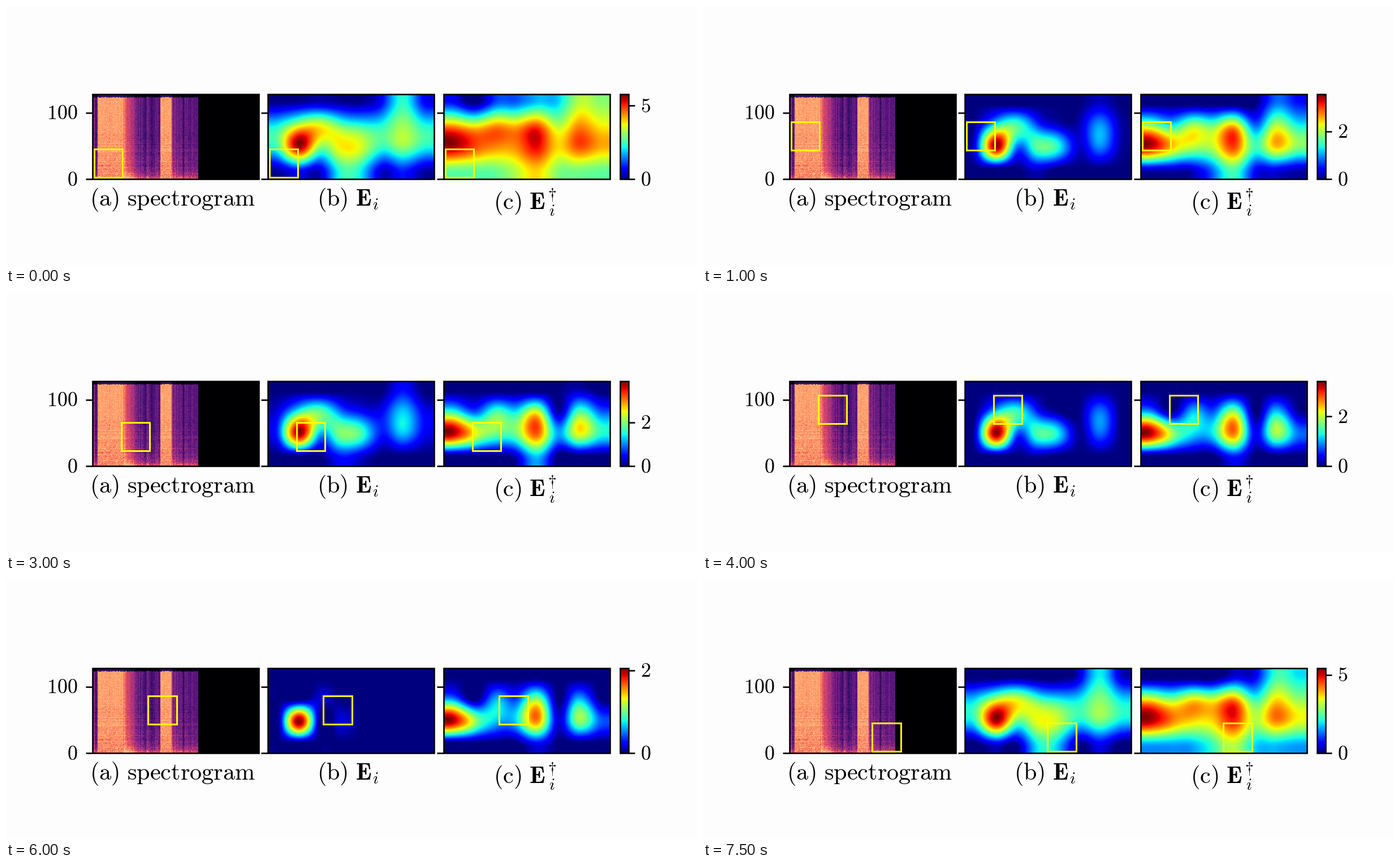
Write a matplotlib script that moves like this. It is 1222 by 458 pixels and loops after 8000 ms.

```python
import numpy as np
import matplotlib.pyplot as plt
from matplotlib.animation import FuncAnimation
from matplotlib.patches import Rectangle

W, H, DPI = 1222, 458, 64
PX = 72 / DPI                       # points per pixel
TOP, BOTTOM, PANEL_W = 156, 306, 293.5
PANELS = (153, 463, 774)
BAR_X, BAR_W = 1085.5, 15
ROWS, COLS = 128, 250               # bins of one map
CELLS_Y, CELLS_X = 4, 8             # coarse cells of one map

plt.rcParams["mathtext.fontset"] = "cm"


def bump(x, y, sx, sy, height):
    """Gaussian hill sampled on the coarse cells."""
    gx = np.exp(-((np.arange(CELLS_X) - x) / sx) ** 2 / 2)
    gy = np.exp(-((np.arange(CELLS_Y) - y) / sy) ** 2 / 2)
    return height * np.outer(gy, gx)


WIDE = 1e3
CELLS_B = (bump(0, 1.5, WIDE, 0.6, 2.9)         # horizontal band
           + bump(1, 2, 0.5, 0.6, 3.5)
           + bump(1.9, 1, 0.7, 0.55, 1.6)
           + bump(3.45, 2.75, 0.65, 0.9, 3.0)
           + bump(6, 1, 0.55, 3, 1.05)
           + bump(6, -0.3, 0.7, 0.5, 1.5))
CELLS_C = (bump(0, 2, WIDE, 1.14, 4.7)          # horizontal band
           + bump(0, 1.5, 0.8, 0.6, 2.6)
           + bump(1, 0, 0.5, 0.5, -1.2)
           + bump(2.3, 0.9, 0.8, 0.6, 2.0)
           + bump(4, 1.1, 0.5, 0.9, 2.2)
           + bump(3.9, 3.2, 0.8, 0.5, 1.4)
           + bump(5, 2, 0.4, 0.9, -0.5)
           + bump(6.4, 0, 1.0, 0.8, 3.0)
           + bump(6, 1.6, 0.5, 0.8, 0.9))

# Peak height per box column: in the lowest box row, and further up
START_B, FLOOR_B = (5.77, 5.4, 4.63, 5.43), (3.57, 3.38, 2.05, 3.5)
START_C, FLOOR_C = (6.7, 4.8, 3.7, 4.9), (3.6, 2.2, 2.15, 2.5)


def peak(start, floor, col, row):
    fall = max(0, 1 - row / 2) ** 2
    return floor[col] + (start[col] - floor[col]) * fall + 0.03 * max(0, row - 2) ** 2


def cubic_weights(n_out, n_in, a=-0.75):
    """Matrix of a bicubic resize with repeated edges."""
    pos = (np.arange(n_out) + 0.5) * n_in / n_out - 0.5
    base = np.floor(pos).astype(int)
    out = np.zeros((n_out, n_in))
    for k in range(-1, 3):
        d = np.abs(pos - base - k)
        near = (a + 2) * d**3 - (a + 3) * d**2 + 1
        far = a * (d**3 - 5 * d**2 + 8 * d - 4)
        idx = np.clip(base + k, 0, n_in - 1)
        np.add.at(out, (np.arange(n_out), idx), np.where(d <= 1, near, far))
    return out


UP_Y, UP_X = cubic_weights(ROWS, CELLS_Y), cubic_weights(COLS, CELLS_X)


def heat(cells, top):
    field = UP_Y @ np.maximum(cells - cells.max() + top, 0) @ UP_X.T
    return np.clip(field / field.max(), 0, 1)


def spectrogram():
    rng = np.random.default_rng(4)
    col, row = np.arange(COLS), np.arange(ROWS)[:, None]
    loud = ((col >= 8) & (col < 47)) | ((col >= 102) & (col < 119))
    tail = np.where(col >= 47, 0.36 * np.exp(-((col - 47) / 15.0) ** 2), 0)
    tail = tail + np.where(col >= 119, 0.22 * np.exp(-(col - 119) / 2.0), 0)
    level = np.where(loud, 0.81, 0.31 + tail)
    level = level + rng.normal(0, 1, COLS) * np.where(loud, 0.01, 0.055)
    quiet = 1.0 - loud
    spec = level + quiet * (0.25 * np.exp(-row / 5) + 0.1 * np.exp(-row / 30) - 0.04)
    spec = spec - loud * 0.08 * np.exp(-row / 35)
    spec = spec + 0.02 * rng.normal(0, 1, (ROWS, 1)) * (row < 75)
    spec = spec + rng.normal(0, 1, (ROWS, COLS)) * (0.025 + 0.04 * np.exp(-row / 45))
    edge = 122.5 + rng.integers(0, 2, COLS)
    spec = np.where(row > edge, 0.25 * spec - 0.03, spec)
    spec[:, 159:] = 0
    return np.clip(spec[::-1], 0, 0.86)


fig = plt.figure(figsize=(W / DPI, H / DPI), dpi=DPI, facecolor="#fdfdfd")
ax = fig.add_axes([0, 0, 1, 1])
ax.axis("off")


def image(data, x, width, cmap, smooth="bilinear"):
    return ax.imshow(data, extent=(x, x + width, BOTTOM, TOP), cmap=cmap, vmin=0,
                     vmax=1, aspect="auto", interpolation=smooth, zorder=1)


def frame(x, width):
    ax.add_patch(Rectangle((x, TOP), width, BOTTOM - TOP, fill=False,
                           ec="black", lw=2.6 * PX, zorder=4))


def tick(x0, x1, y):
    return ax.plot([x0, x1], [y, y], color="black", lw=2.6 * PX,
                   solid_capstyle="butt", zorder=4)[0]


def label(x, y, tex, size=36, ha="left"):
    return ax.text(x, y, f"${tex}$", fontsize=size * PX, ha=ha, va="baseline")


image(spectrogram(), PANELS[0], PANEL_W, "magma", "nearest")
map_b = image(np.zeros((ROWS, COLS)), PANELS[1], PANEL_W, "jet")
map_c = image(np.zeros((ROWS, COLS)), PANELS[2], PANEL_W, "jet")
image(np.linspace(1, 0, 256)[:, None], BAR_X, BAR_W, "jet")

boxes = []
for x in PANELS:
    frame(x, PANEL_W)
    tick(x - 12, x, 188.5)
    tick(x - 12, x, BOTTOM)
    box = Rectangle((x, 0), 50.5, 50, fill=False, ec="yellow", lw=3 * PX, zorder=3)
    boxes.append(ax.add_patch(box))
frame(BAR_X, BAR_W)
tick(BAR_X + BAR_W, 1112, BOTTOM)
bar_tick = tick(BAR_X + BAR_W, 1112, TOP)

label(127, 200.5, r"\mathrm{100}", ha="right")
label(127, 318, r"\mathrm{0}", ha="right")
label(148, 353, r"\mathrm{(a)\ spectrogram}", 42.2)
label(550, 353, r"\mathrm{(b)}\ \mathbf{E}_i", 42.2)
label(862, 359, r"\mathrm{(c)}\ \mathbf{E}", 42.2)
label(965, 341, r"\dagger", 29.5, "center")
label(965, 371, "i", 29.5, "center")
bar_zero = label(1122, 318, "0")
bar_step = label(1122, 0, "2")

ax.set_xlim(0, W)
ax.set_ylim(H, 0)


def update(i):
    col, row = divmod(i, 5)
    for box, x in zip(boxes, PANELS):
        box.set_xy((x + 2.7 + 47.8 * col, 253 - 24.05 * row))
    top = peak(START_B, FLOOR_B, col, row)
    map_b.set_data(heat(CELLS_B, top))
    map_c.set_data(heat(CELLS_C, peak(START_C, FLOOR_C, col, row)))
    step = 2 if top <= 4 else 2.5 if top <= 5 else 5
    y = BOTTOM - (BOTTOM - TOP) * step / top
    bar_tick.set_ydata([y, y])
    bar_step.set_y(y + 11.5)
    bar_step.set_text(rf"$\mathrm{{{step}}}$")
    bar_zero.set_text(r"$\mathrm{0.0}$" if step == 2.5 else r"$\mathrm{0}$")
    return [*boxes, map_b, map_c, bar_tick, bar_step, bar_zero]


anim = FuncAnimation(fig, update, frames=16, interval=500, repeat=True)
plt.show()
```
